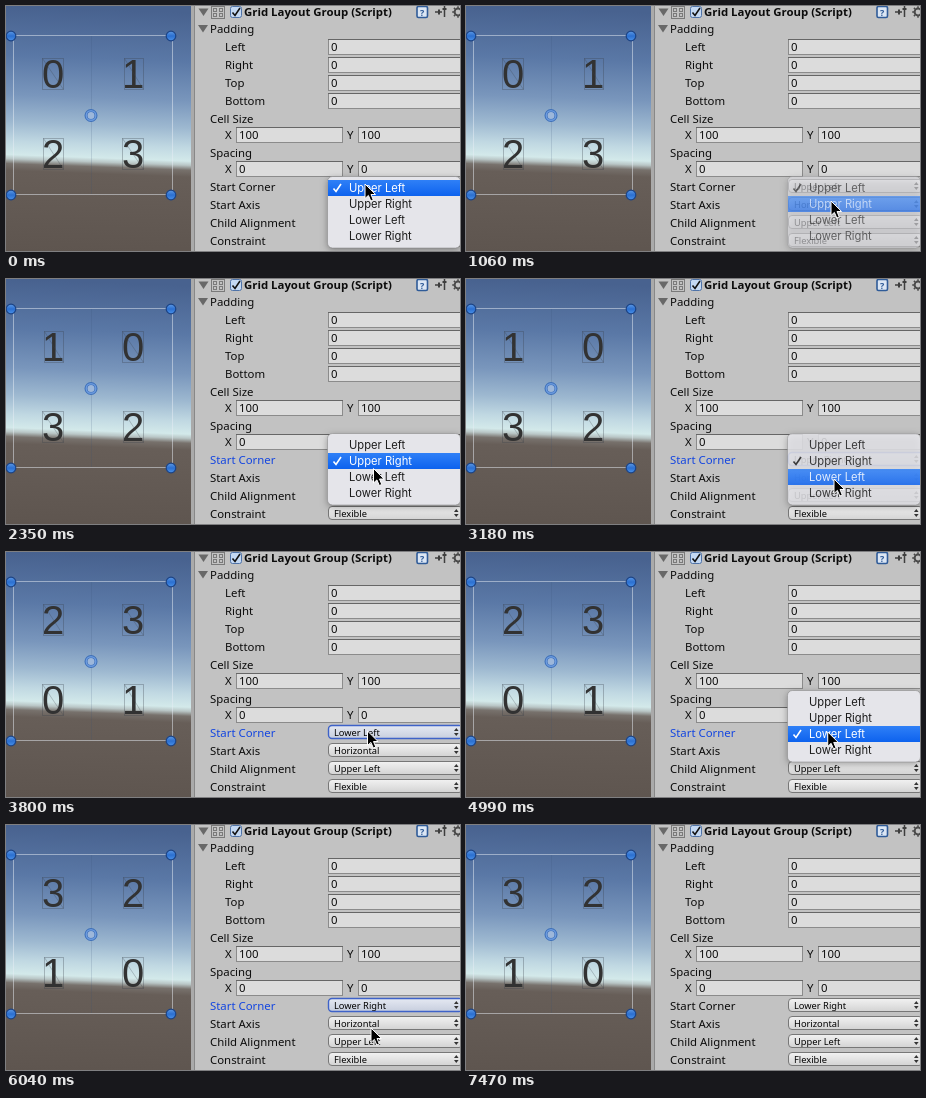
Animation, 454 px wide and 245 px high, one loop 7510 ms. Source, as an HTML page with a canvas:

```html
<!DOCTYPE html>
<html lang="en">
<head>
<meta charset="utf-8">
<title>Grid Layout Group: start corner</title>
<style>
  html, body { margin: 0; width: 100%; height: 100%; overflow: hidden; background: #c2c2c2; }
  canvas { display: block; width: 454px; height: 245px; }
</style>
</head>
<body>
<canvas id="stage" width="454" height="245"></canvas>
<script>
const LOOP = 7510;
const BLUR_AT = 7470;
const ctx = document.getElementById('stage').getContext('2d');

const UI = '"Noto Sans", "Open Sans", sans-serif';
const LABEL = `11.4px ${UI}`;
const SMALL = `9.3px ${UI}`;
const MENU = '11.2px Inter, sans-serif';
const DIGIT = '40px "Liberation Sans", Arial, sans-serif';

const corners = ['Upper Left', 'Upper Right', 'Lower Left', 'Lower Right'];
const orders = ['0123', '1032', '2301', '3210'];

// Popup number n shows corner n checked and ends by choosing corner n + 1.
const menus = [
  { open: 0, pick: 890 },
  { open: 2110, pick: 3060 },
  { open: 4700, pick: 5640 }
];
const CHANGE = 400;
const fade = [[290, 0], [230, 0.25], [170, 0.62], [115, 0.85], [0, 1]];

// Pointer moves: start, end, steps, target x, target y
const start = [359, 178];
const moves = [
  [180, 530, 7, 365, 195],
  [1530, 1950, 8, 366, 182],
  [2350, 2350, 1, 367.5, 189.5],
  [2400, 2520, 3, 368, 200],
  [3520, 3800, 6, 361.5, 179],
  [4990, 5340, 7, 365.5, 196],
  [5810, 6040, 4, 365, 203],
  [6640, 6990, 7, 408, 250]
];

function pointer(t) {
  let [x, y] = start;
  for (const [from, to, steps, tx, ty] of moves) {
    if (t < from) break;
    const gap = (to - from) / Math.max(1, steps - 1);
    const done = t >= to ? 1 : (Math.floor((t - from) / gap) + 1) / steps;
    const k = done * done * (3 - 2 * done);
    x += (tx - x) * k;
    y += (ty - y) * k;
  }
  return [x, y];
}

function text(str, x, y, font = LABEL, color = '#0c0c0c') {
  ctx.font = font;
  ctx.fillStyle = color;
  ctx.fillText(str, x, y);
}

function poly(points, fill) {
  ctx.beginPath();
  points.forEach(([x, y]) => ctx.lineTo(x, y));
  ctx.closePath();
  ctx.fillStyle = fill;
  ctx.fill();
}

function line(x1, y1, x2, y2, color, width = 1) {
  ctx.strokeStyle = color;
  ctx.lineWidth = width;
  ctx.beginPath();
  ctx.moveTo(x1, y1);
  ctx.lineTo(x2, y2);
  ctx.stroke();
}

function round(x, y, w, h, r) {
  ctx.beginPath();
  ctx.roundRect(x, y, w, h, r);
}

function gradient(x1, y1, x2, y2, stops) {
  const g = ctx.createLinearGradient(x1, y1, x2, y2);
  stops.forEach(([at, color]) => g.addColorStop(at, color));
  return g;
}

function disc(x, y, r, fill, stroke, width = 1) {
  ctx.beginPath();
  ctx.arc(x, y, r, 0, 7);
  if (fill) { ctx.fillStyle = fill; ctx.fill(); }
  if (stroke) { ctx.strokeStyle = stroke; ctx.lineWidth = width; ctx.stroke(); }
}

function handle(x, y) {
  disc(x, y, 4.8, gradient(x, y - 5, x, y + 5,
    [[0, '#5f9be6'], [0.5, '#2b6fd0'], [1, '#4a92ea']]), '#1c4384', 1.2);
}

function digit(ch, cx, cy) {
  ctx.font = DIGIT;
  const m = ctx.measureText(ch);
  const x = cx - m.width / 2, y = cy + 14;
  text(ch, x, y, DIGIT, '#323232');
  const l = Math.round(x - m.actualBoundingBoxLeft) - 0.5;
  const r = Math.round(x + m.actualBoundingBoxRight) + 0.5;
  ctx.strokeStyle = 'rgba(60,65,75,.38)';
  ctx.lineWidth = 0.8;
  ctx.strokeRect(l, cy - 15.5, r - l, 31);
  line(l, cy - 15.5, r, cy + 15.5, 'rgba(60,65,75,.35)', 0.8);
}

function scene(order) {
  ctx.fillStyle = gradient(0, 0, -9, 245, [
    [0, '#48628f'], [0.2, '#5a78a6'], [0.36, '#7996bc'], [0.47, '#9db8d0'],
    [0.55, '#c0d8e2'], [0.605, '#d3e9ea'], [0.622, '#b9c6c6'],
    [0.642, '#77716c'], [0.67, '#675e58'], [1, '#5e554f']
  ]);
  ctx.fillRect(0, 0, 186, 245);
  line(85.5, 30, 85.5, 188, 'rgba(60,80,120,.16)');
  ctx.strokeStyle = 'rgba(232,238,245,.5)';
  ctx.lineWidth = 1;
  ctx.strokeRect(7.5, 29.5, 159, 159);
  [...order].forEach((ch, i) => digit(ch, 47 + i % 2 * 80, 68 + (i >> 1) * 80));
  for (const x of [5, 165]) for (const y of [30, 189]) handle(x, y);
  disc(85, 109.5, 5, '#9db7da', '#3d6fb8', 3);
  disc(85, 109.5, 4.8, null, '#6b9ade', 1.4);
}

function foldout(x, y) {
  poly([[x - 5, y - 3.5], [x + 5, y - 3.5], [x, y + 4]], '#686868');
}

function check(x, y, color) {
  ctx.strokeStyle = color;
  ctx.lineWidth = 1.6;
  ctx.beginPath();
  ctx.moveTo(x - 3.5, y + 0.5);
  ctx.lineTo(x - 1, y + 3.5);
  ctx.lineTo(x + 4, y - 4);
  ctx.stroke();
}

function header() {
  foldout(197.5, 6);
  ctx.strokeStyle = '#7a7a7a';
  ctx.lineWidth = 1;
  ctx.strokeRect(205.5, 0.5, 13, 12);
  for (const x of [207.5, 213.5]) for (const y of [2.5, 7.5]) ctx.strokeRect(x, y, 3, 3);
  round(224.5, 0.5, 11, 11, 2);
  ctx.fillStyle = '#c3d8f3';
  ctx.fill();
  ctx.strokeStyle = '#4f73a8';
  ctx.stroke();
  check(230, 6, '#111');
  text('Grid Layout Group (Script)', 238, 10, `bold ${LABEL}`);

  round(411, 0.5, 10.5, 11, 1.5);
  ctx.fillStyle = '#dbe6f4';
  ctx.fill();
  ctx.strokeStyle = '#2f5b98';
  ctx.lineWidth = 1.6;
  ctx.stroke();
  text('?', 414, 9.5, `bold 9px ${UI}`, '#2f5b98');
  line(429, 6, 436, 6, '#3e3e3e', 1.5);
  line(433, 3.5, 433, 8.5, '#3e3e3e', 2);
  line(438.5, 0, 438.5, 11, '#3e3e3e', 1.5);
  line(436.5, 3, 440.5, 3, '#3e3e3e', 2);
  disc(452, 6, 3.4, null, '#4a4a4a', 2);
  for (let i = 0; i < 8; i++) {
    const c = Math.cos(i * Math.PI / 4), s = Math.sin(i * Math.PI / 4);
    line(452 + c * 4, 6 + s * 4, 452 + c * 5.8, 6 + s * 5.8, '#4a4a4a', 1.5);
  }
}

function field(x, y, w, value) {
  ctx.fillStyle = '#dcdcdc';
  ctx.fillRect(x, y - 7, w, 14);
  ctx.strokeStyle = '#8b8b8b';
  ctx.lineWidth = 1;
  ctx.strokeRect(x + 0.5, y - 7.5, w - 1, 15);
  line(x, y - 7.5, x + w, y - 7.5, '#666');
  text(value, x + 3, y + 4);
}

function pair(y, value) {
  text('X', 219, y + 4);
  field(230, y, 107, value);
  text('Y', 341, y + 4);
  field(352, y, 107, value);
}

function popup(y, value, focus) {
  round(322.5, y - 6.5, 134, 13, 3.5);
  ctx.fillStyle = gradient(0, y - 7, 0, y + 7, focus
    ? [[0, '#e6eaf3'], [1, '#c6cddd']]
    : [[0, '#f3f3f3'], [1, '#d2d2d2']]);
  ctx.fill();
  ctx.strokeStyle = focus ? '#3e62c8' : '#777';
  ctx.lineWidth = focus ? 1.4 : 1;
  ctx.stroke();
  text(value, 328, y + 3.5, SMALL, '#000');
  poly([[448, y - 1], [452.6, y - 1], [450.3, y - 4]], '#333');
  poly([[448, y + 1], [452.6, y + 1], [450.3, y + 4]], '#333');
}

function inspector(corner, focus) {
  ctx.fillStyle = '#c2c2c2';
  ctx.fillRect(185, 0, 269, 245);
  line(186.5, 0, 186.5, 245, '#aaa', 3);
  line(188.5, 0, 188.5, 245, '#888');
  header();
  foldout(197, 22.5);
  text('Padding', 204, 26.5);
  ['Left', 'Right', 'Top', 'Bottom'].forEach((name, i) => {
    text(name, 219, 45 + i * 18);
    field(322, 41 + i * 18, 140, '0');
  });
  text('Cell Size', 204, 116.5);
  pair(129, '100');
  text('Spacing', 204, 151);
  pair(163, '0');
  [['Start Corner', corners[corner]], ['Start Axis', 'Horizontal'],
    ['Child Alignment', 'Upper Left'], ['Constraint', 'Flexible']]
    .forEach(([name, value], i) => {
      const on = focus && i === 0, y = 181 + i * 18;
      text(name, 204, y + 4, LABEL, on ? '#1446e0' : '#0c0c0c');
      popup(y - 1, value, on);
    });
}

function menu(checked, hover, alpha) {
  const top = 171 - checked * 16;
  ctx.save();
  ctx.globalAlpha = alpha;
  ctx.shadowColor = 'rgba(0,0,0,.35)';
  ctx.shadowBlur = 7;
  ctx.shadowOffsetY = 2;
  round(321.5, top - 0.5, 133, 71.5, 5);
  ctx.fillStyle = '#e5e5ea';
  ctx.fill();
  ctx.shadowColor = 'transparent';
  ctx.strokeStyle = 'rgba(130,130,130,.65)';
  ctx.lineWidth = 0.8;
  ctx.stroke();
  corners.forEach((name, i) => {
    const y = top + 11 + i * 16, lit = i === hover;
    if (lit) {
      ctx.fillStyle = gradient(0, y - 8, 0, y + 8, [[0, '#2f80f7'], [1, '#0d62ee']]);
      ctx.fillRect(322, y - 8, 132, 16);
    }
    const color = lit ? '#fff' : '#1c1c1c';
    if (i === checked) check(331, y, color);
    text(name, 343, y + 4, MENU, color);
  });
  ctx.restore();
}

function arrow(x, y) {
  const shape = [[0, 0], [0, 14.5], [3.4, 11.4], [5.8, 17], [8.3, 16], [6, 10.5], [10.6, 10.5]];
  ctx.save();
  ctx.translate(x, y);
  poly(shape, '#000');
  ctx.strokeStyle = '#fff';
  ctx.lineWidth = 1;
  ctx.lineJoin = 'round';
  ctx.stroke();
  ctx.restore();
}

function draw(t) {
  const corner = menus.filter(m => t >= m.pick + CHANGE).length;
  const [x, y] = pointer(t);
  ctx.clearRect(0, 0, 454, 245);
  scene(orders[corner]);
  inspector(corner, corner > 0 && t < BLUR_AT);

  const m = menus[corner];
  if (m && t >= m.open) {
    const since = t - m.pick;
    const alpha = since < 0 ? 1 : fade.find(([at]) => since >= at)[1];
    const blink = since >= 0 && since < 50;
    const row = since >= 0 ? corner + 1 : Math.floor((y - 174 + corner * 16) / 16);
    if (alpha) menu(corner, blink ? -1 : row, alpha);
  }
  arrow(x, y);
}

const t0 = performance.now();
function tick(now) {
  draw(Math.max(0, now - t0) % LOOP);
  requestAnimationFrame(tick);
}
draw(0);
requestAnimationFrame(tick);
</script>
</body>
</html>
```
